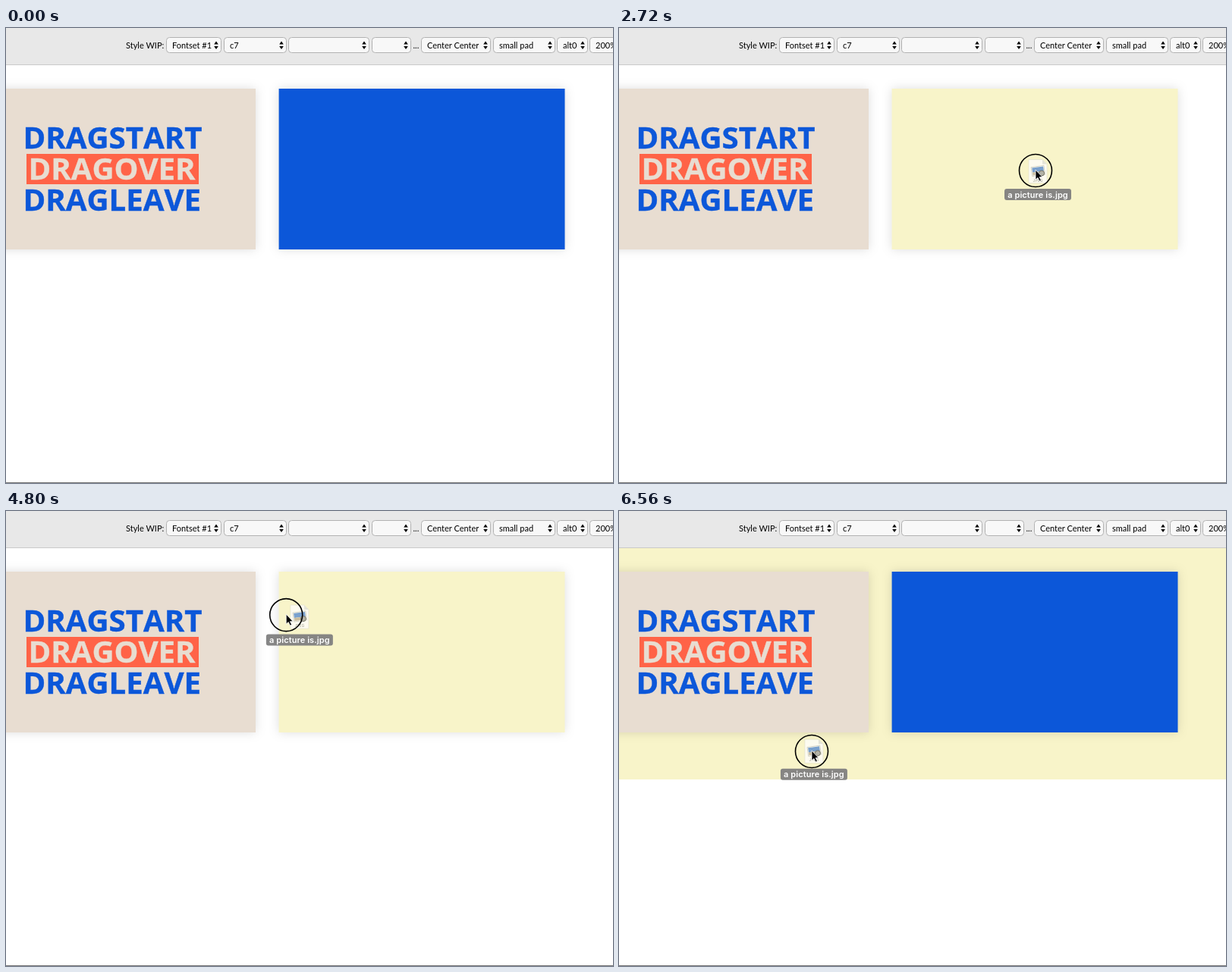
An HTML page for the animation above (6.64 s loop, 800x600 px).

```html
<!DOCTYPE html>
<html lang="en">
<head>
<meta charset="utf-8">
<title>Drag states</title>
<style>
  html, body { margin: 0; width: 100%; height: 100%; overflow: hidden; background: #fff; }
  svg { display: block; width: 800px; height: 600px; }
  .ui { font: 11px Lato, sans-serif; fill: #000; }
  .head { font: 700 40.2px "Open Sans", sans-serif; font-kerning: none; fill: #0c57d9; stroke: #0c57d9; stroke-width: .4; }
  .head .over { fill: #e8ddd1; stroke: #e8ddd1; }
  .label { font: 600 11px Inter, sans-serif; letter-spacing: .08px; fill: #fff; text-anchor: middle; }
  .card { filter: drop-shadow(0 0 7px rgba(0, 0, 0, .13)); }
</style>
</head>
<body>
<svg viewBox="0 0 800 600">
  <rect id="page" y="49" width="800" height="305" fill="#f8f4c9"/>
  <rect width="800" height="48" fill="#e8e8e8"/>
  <rect y="48" width="800" height="1" fill="#c9c9c9"/>
  <rect y="599" width="800" height="1" fill="#777"/>
  <g id="bar" class="ui"><text x="158" y="27">Style WIP:</text></g>

  <rect id="left" class="card" x="-48" y="80" width="377" height="212"/>
  <rect x="27" y="166" width="227" height="40" fill="#ff6347"/>
  <g class="head">
    <text x="22.4" y="159.3">DRAGSTART</text>
    <text x="29.4" y="200" class="over">DRAGOVER</text>
    <text x="22.4" y="240.7">DRAGLEAVE</text>
  </g>
  <rect id="right" class="card" x="359.6" y="80" width="376.9" height="212"/>

  <g id="file">
    <g opacity=".72">
      <path d="M-12-46H6L12-40V-15H-12Z" fill="#fff" stroke="#ccc" stroke-width=".5"/>
      <path d="M6-46V-40H12Z" fill="#ddd"/>
      <g transform="rotate(-8 0 -30)">
        <rect x="-8" y="-37" width="17" height="12" fill="#fff" stroke="#999" stroke-width=".5"/>
        <rect x="-7" y="-36" width="15" height="6" fill="#4a82d0"/>
        <rect x="-7" y="-30" width="15" height="4" fill="#b9a88f"/>
      </g>
      <circle cx="5" cy="-28" r="3.5" fill="#999" stroke="#444"/>
      <text y="-17" text-anchor="middle" font-family="Inter, sans-serif" font-size="5" fill="#777">JPEG</text>
    </g>
    <rect x="-44" y="-7.5" width="88" height="15" rx="3" fill="#7f7f7f" fill-opacity=".94"/>
    <text class="label" y="4">a picture is.jpg</text>
  </g>
  <g id="pointer">
    <circle r="21.5" fill="none" stroke="#000" stroke-width="1.6"/>
    <path d="M0-1V12L3 9.4L5.2 14L7.4 13L5.2 8.6H9Z" fill="#000" stroke="#fff" stroke-width=".8"/>
  </g>
</svg>
<script>
const LOOP = 6640, STEP = 80, LAG = 52;
const YELLOW = '#f8f4c9', BEIGE = '#e8ddd1', BLUE = '#0c57d9';
const $ = id => document.getElementById(id);

// resting places of the pointer; it eases from one to the next
const stops = [
  { t: 0, x: 800, y: 522 },
  { t: 720, x: 700, y: 514 },
  { t: 1680, x: 581.5, y: 321, until: 1920 },
  { t: 2640, x: 549, y: 188, until: 2720 },
  { t: 3280, x: 756, y: 174 },
  { t: 3920, x: 681, y: 168 },
  { t: 4960, x: 348, y: 135 },
  { t: 5200, x: 380, y: 221, until: 5600 },
  { t: 6220, x: 246, y: 204, until: 6320 },
  { t: 6520, x: 254, y: 317, until: LOOP }
];

const ease = k => k * k * (3 - 2 * k);

function at(time) {
  const t = Math.max(0, time);
  const i = stops.findLastIndex(s => s.t <= t);
  const a = stops[i], b = stops[i + 1] || a;
  const leave = a.until ?? a.t;
  const k = t > leave ? ease((t - leave) / (b.t - leave)) : 0;
  return { x: a.x + (b.x - a.x) * k, y: a.y + (b.y - a.y) * k };
}

function zone({ x, y }) {
  if (y > 354) return '';
  if (y < 80 || y > 292) return 'page';
  if (x < 329) return 'left';
  return x > 360 && x < 737 ? 'right' : 'page';
}

function place(id, x, y, visible) {
  $(id).setAttribute('transform', `translate(${x} ${y})`);
  $(id).style.visibility = visible ? 'visible' : 'hidden';
}

function draw(time) {
  const t = Math.floor(time % LOOP / STEP) * STEP;
  const hand = at(t), file = at(t - LAG);
  // hover colours trail the pointer by one step
  const over = zone(at(t - STEP));

  $('page').style.visibility = over === 'page' ? 'visible' : 'hidden';
  $('left').setAttribute('fill', over === 'left' ? YELLOW : BEIGE);
  $('right').setAttribute('fill', over === 'right' ? YELLOW : BLUE);
  place('pointer', hand.x, hand.y, t > 0);
  place('file', file.x + 3, file.y + 31.5, t > 0);
}

function select(x, w, label) {
  const r = x + w - 7;
  return `<rect x="${x + .5}" y="12.5" width="${w - 1}" height="20" rx="4" fill="#f8f8f8" stroke="#b2b2b2"/>
    <text x="${x + 8}" y="27">${label}</text>
    <path d="M${r - 2.8} 21.5h5.6l-2.8-4zm0 2.5h5.6l-2.8 4z"/>`;
}

function fillBar() {
  const items = [
    ['Fontset #1', 73], ['c7', 83], ['', 107], ['', 52], ['...', 7.5],
    ['Center Center', 92], ['small pad', 81.5], ['alt0', 40.5], ['200%', 60]
  ];
  let x = 211;
  for (const [label, w] of items) {
    const left = Math.round(x);
    $('bar').innerHTML += label === '...'
      ? `<text x="${left - .5}" y="27">...</text>`
      : select(left, Math.round(w), label);
    x += w + 2.7;
  }
}

fillBar();
const start = performance.now();
function tick() {
  draw(performance.now() - start);
  requestAnimationFrame(tick);
}
tick();
</script>
</body>
</html>
```
